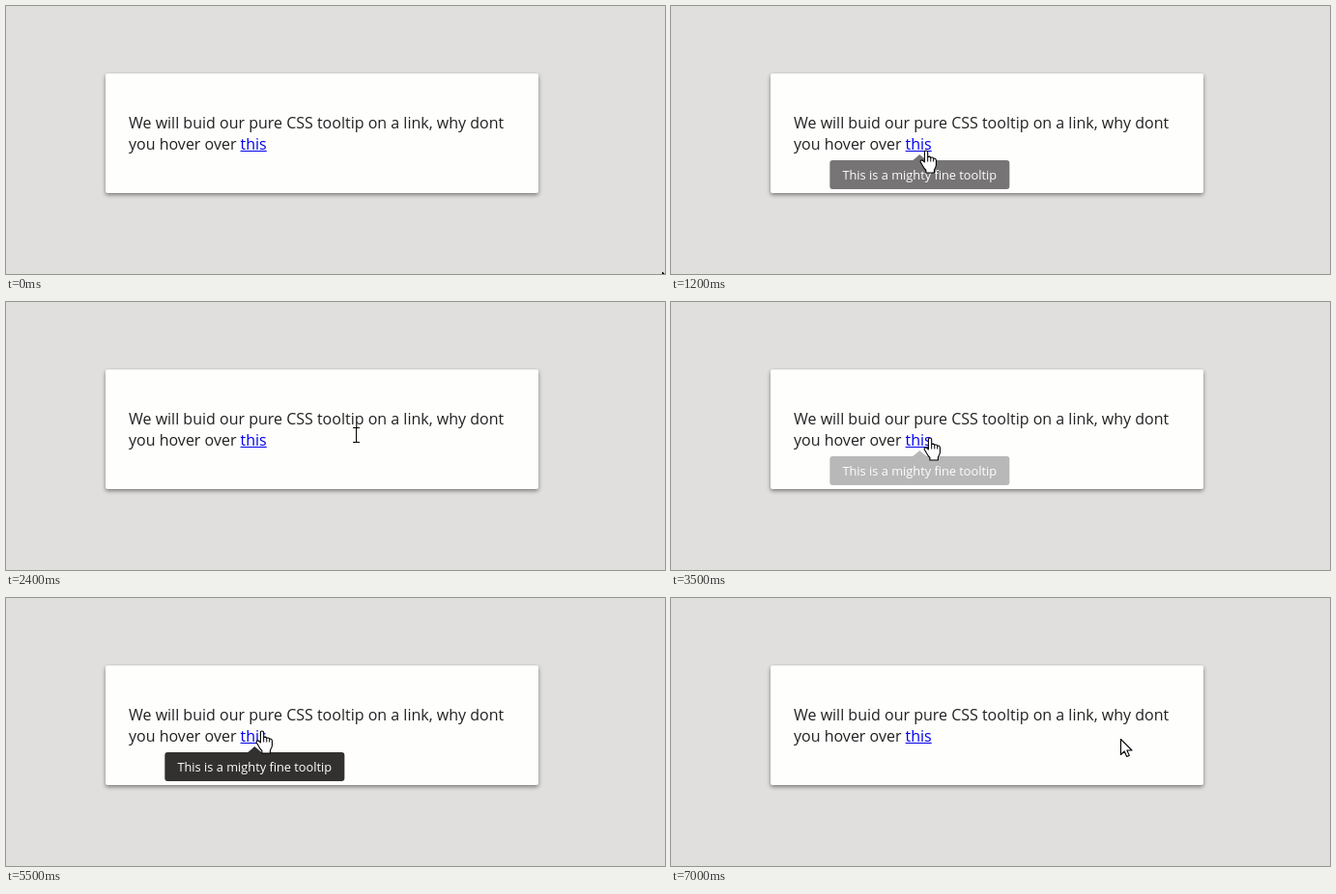
An HTML page that plays this animation: 682 by 278 pixels, repeating every 7100 ms.

```html
<!DOCTYPE html>
<html lang="en">
<head>
<meta charset="utf-8">
<title>Pure CSS tooltip</title>
<style>
  html, body { margin: 0; width: 100%; height: 100%; overflow: hidden; }
  body {
    position: relative;
    background: #e0dfde;
    color: #222;
    font: 16px "Open Sans", sans-serif;
    cursor: default;
  }
  .card {
    position: absolute;
    left: 103px; top: 70px;
    width: 448px; height: 124px;
    box-sizing: border-box;
    padding: 40px 24px;
    border-radius: 2px;
    background: #fefefd;
    box-shadow: 0 2px 4px rgba(0, 0, 0, .45);
    line-height: 22px;
  }
  .link { color: #00e; text-decoration: underline; }
  .tip {
    position: absolute;
    left: 257.3px; top: 160px;
    height: 30px;
    padding: 0 12.8px;
    border-radius: 3px;
    background: #333030;
    color: #fff;
    font-size: 12.8px;
    line-height: 30px;
    white-space: nowrap;
    transform: translateX(-50%);
    opacity: 0;
  }
  .tip::before {
    content: "";
    position: absolute;
    left: 50%; top: -6px;
    margin-left: -7px;
    border: solid transparent;
    border-width: 0 7px 6px;
    border-bottom-color: #333030;
  }
  svg { position: absolute; left: 0; top: 0; width: 100%; height: 100%; }
  #cursor path { fill: #fff; stroke: #000; stroke-width: 1.1; stroke-linejoin: round; }
  #cursor .line { fill: none; stroke-width: 1; }
</style>
</head>
<body>
<div class="card">We will buid our pure CSS tooltip on a link, why dont<br>you hover over <span class="link">this</span></div>
<div class="tip" id="tip">This is a mighty fine tooltip</div>
<svg>
  <g id="cursor">
    <g id="arrow">
      <path d="M.5 .5V16.5L4.2 13L6.7 18.5L9.3 17.4L6.9 12H12Z"/>
    </g>
    <g id="beam">
      <path class="line" d="M-3 -7.5H4M.5 -7.5V7.5M-3 7.5H4"/>
    </g>
    <g id="hand" transform="translate(-6.6 -.5)">
      <path d="M5 12.5V2Q5 .5 6.6 .5T8.3 2V7.5Q8.5 6.6 10 6.6Q11.4 6.8 11.4 8.2Q11.7 7.3 13 7.5Q14.3 7.8 14.3 9Q14.8 8.3 15.8 8.7Q17 9.2 17 10.5V15.5Q17 17.5 15 20.5V23.5H6.5V21Q4.5 19 3.2 16.5Q2 14 .8 12.6Q.2 11 1.6 10.4Q3 10.2 5 12.5Z"/>
      <path class="line" d="M8.3 7.5V12M11.4 8.2V12M14.3 9V12"/>
    </g>
  </g>
</svg>
<script>
const LOOP = 7100, TICK = 100, FADE = 300;

// time, x, y, pointer shape from then on
const path = [
  [0, 679, 276, 'arrow'],
  [200, 600, 245, 'arrow'],
  [500, 390, 180, 'arrow'],
  [700, 295, 157, 'arrow'],
  [900, 264, 150, 'hand'],
  [1500, 264, 150, 'hand'],
  [1900, 269, 146, 'hand'],
  [2000, 273, 145, 'beam'],
  [2200, 305, 140, 'beam'],
  [2400, 362, 138, 'beam'],
  [2500, 432, 132, 'arrow'],
  [2600, 500, 128, 'beam'],
  [2800, 500, 128, 'beam'],
  [3000, 450, 132, 'arrow'],
  [3200, 345, 140, 'beam'],
  [3400, 270, 143, 'hand'],
  [3700, 265, 138, 'hand'],
  [6000, 265, 138, 'hand'],
  [6200, 285, 141, 'beam'],
  [6400, 360, 148, 'arrow'],
  [6600, 435, 151, 'arrow'],
  [6800, 462, 148, 'arrow'],
  [7000, 465, 146, 'arrow'],
  [LOOP, 465, 146, 'arrow']
];
const hovers = [[1000, 2000], [3400, 6200]];

const byId = id => document.getElementById(id);
const clamp = v => Math.max(0, Math.min(1, v));
const shapes = ['arrow', 'beam', 'hand'].map(byId);
const cursor = byId('cursor'), tip = byId('tip');

const tipOpacity = t => Math.max(...hovers.map(([on, off]) =>
  Math.min(clamp((t - on) / FADE), clamp(1 - (t - off) / FADE))));

function draw(t) {
  const next = path.findIndex(key => key[0] > t);
  const [t0, x0, y0, shape] = path[next - 1];
  const [t1, x1, y1] = path[next];
  const k = (t - t0) / (t1 - t0);
  const x = Math.round(x0 + (x1 - x0) * k);
  const y = Math.round(y0 + (y1 - y0) * k);
  cursor.setAttribute('transform', `translate(${x} ${y})`);
  for (const s of shapes) s.style.display = s.id === shape ? '' : 'none';
  tip.style.opacity = tipOpacity(t);
}

const start = performance.now();
function frame() {
  const t = (performance.now() - start) % LOOP;
  draw(Math.floor(t / TICK) * TICK);
  requestAnimationFrame(frame);
}
frame();
</script>
</body>
</html>
```
